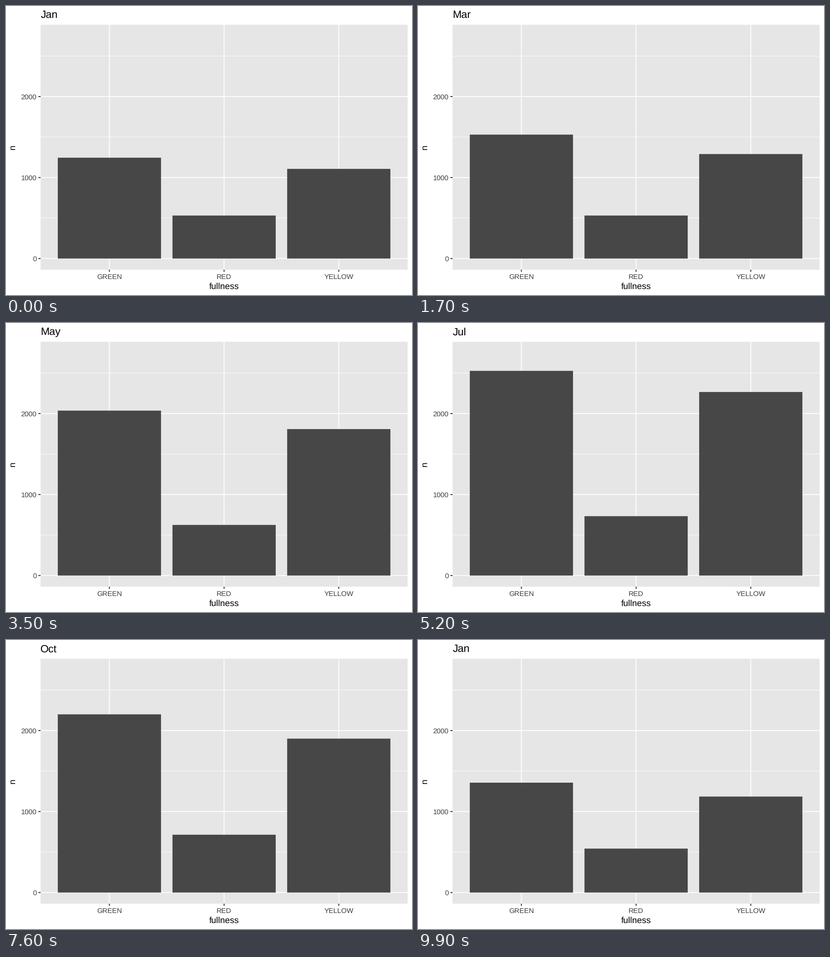
Write a matplotlib script that moves like this. It is 885 px wide and 632 px high and loops after 10 s.

```python
import matplotlib.pyplot as plt
from matplotlib.animation import FuncAnimation
from matplotlib.patches import Rectangle

plt.rcParams["font.family"] = "Liberation Sans"
plt.rcParams["text.hinting"] = "none"

W, H, DPI = 885, 632, 100
LEFT, RIGHT, TOP, BOTTOM = 75.4, 875.4, 41.0, 576.6
ZERO, UNIT = 552.3, 0.17715      # pixel row of n = 0, pixels per count
STEP = (RIGHT - LEFT) / 3.2      # distance between categories
PANEL, BAR, LABEL, TICK = "#e6e6e6", "#474747", "#3d3d3d", "#262626"

CATEGORIES = ["GREEN", "RED", "YELLOW"]
MONTHS = [
    ("Jan", 1245, 531, 1107),
    ("Feb", 1270, 488, 1085),
    ("Mar", 1530, 531, 1290),
    ("Apr", 1810, 612, 1575),
    ("May", 2036, 625, 1808),
    ("Jun", 2300, 630, 2050),
    ("Jul", 2527, 733, 2266),
    ("Aug", 2747, 797, 2450),
    ("Sep", 2572, 814, 2270),
    ("Oct", 2200, 714, 1900),
    ("Nov", 1715, 661, 1442),
    ("Dec", 1691, 577, 1419),
]
FRAMES, MOVE = 100, 4

fig = plt.figure(figsize=(W / DPI, H / DPI), dpi=DPI, facecolor="white")
ax = fig.add_axes([0, 0, 1, 1])
ax.set_xlim(0, W)
ax.set_ylim(H, 0)
ax.axis("off")


def pt(px):
    return px * 72 / DPI


def row(n):
    return ZERO - n * UNIT


def line(xs, ys, width, color, z):
    ax.plot(xs, ys, color=color, lw=pt(width), zorder=z,
            solid_capstyle="butt", snap=False)


def label(x, y, text, size, color="black", ha="center", **kw):
    return ax.text(x, y, text, fontsize=pt(size), color=color, ha=ha,
                   va="baseline", **kw)


ax.add_patch(Rectangle((LEFT, TOP), RIGHT - LEFT, BOTTOM - TOP,
                       fc=PANEL, lw=0, zorder=0, snap=False))

for n in (500, 1500, 2500):
    line([LEFT, RIGHT], [row(n)] * 2, 0.93, "white", 1)
for n in (0, 1000, 2000):
    line([LEFT, RIGHT], [row(n)] * 2, 1.87, "white", 2)
    line([LEFT - 4.8, LEFT], [row(n)] * 2, 1.87, TICK, 4)
    label(LEFT - 8.6, row(n) + 5.6, str(n), 15.4, LABEL, "right")

bars = []
for k, name in enumerate(CATEGORIES):
    x = LEFT + STEP * (0.6 + k)
    line([x, x], [TOP, BOTTOM], 1.87, "white", 2)
    line([x, x], [BOTTOM, BOTTOM + 4.8], 1.87, TICK, 4)
    label(x, 596.6, name, 15.4, LABEL)
    bar = Rectangle((x - 0.45 * STEP, ZERO), 0.9 * STEP, 0,
                    fc=BAR, lw=0, zorder=3, snap=False)
    bars.append(ax.add_patch(bar))

label((LEFT + RIGHT) / 2, 618.4, "fullness", 19.25)
ax.text(23.4, (TOP + BOTTOM) / 2, "n", fontsize=pt(19.25), rotation=90,
        ha="right", va="center")
title = label(LEFT, 26.3, "Jan", 23.1, ha="left")


def move_start(i):
    """First frame of the move away from month i."""
    return 5 + 8 * i + min(i, 4)


def update(frame):
    past = [i for i in range(len(MONTHS)) if move_start(i) <= frame]
    i = past[-1] if past else 0
    t = min(max((frame - move_start(i) + 1) / MOVE, 0), 1)
    old, new = MONTHS[i], MONTHS[(i + 1) % len(MONTHS)]
    title.set_text(new[0] if t > 0.5 else old[0])
    for bar, a, b in zip(bars, old[1:], new[1:]):
        bar.set_height(-(a + (b - a) * t) * UNIT)
    return [title, *bars]


anim = FuncAnimation(fig, update, frames=FRAMES, interval=100,
                     init_func=lambda: update(0), repeat=True,
                     repeat_delay=0, blit=False)
plt.show()
```
